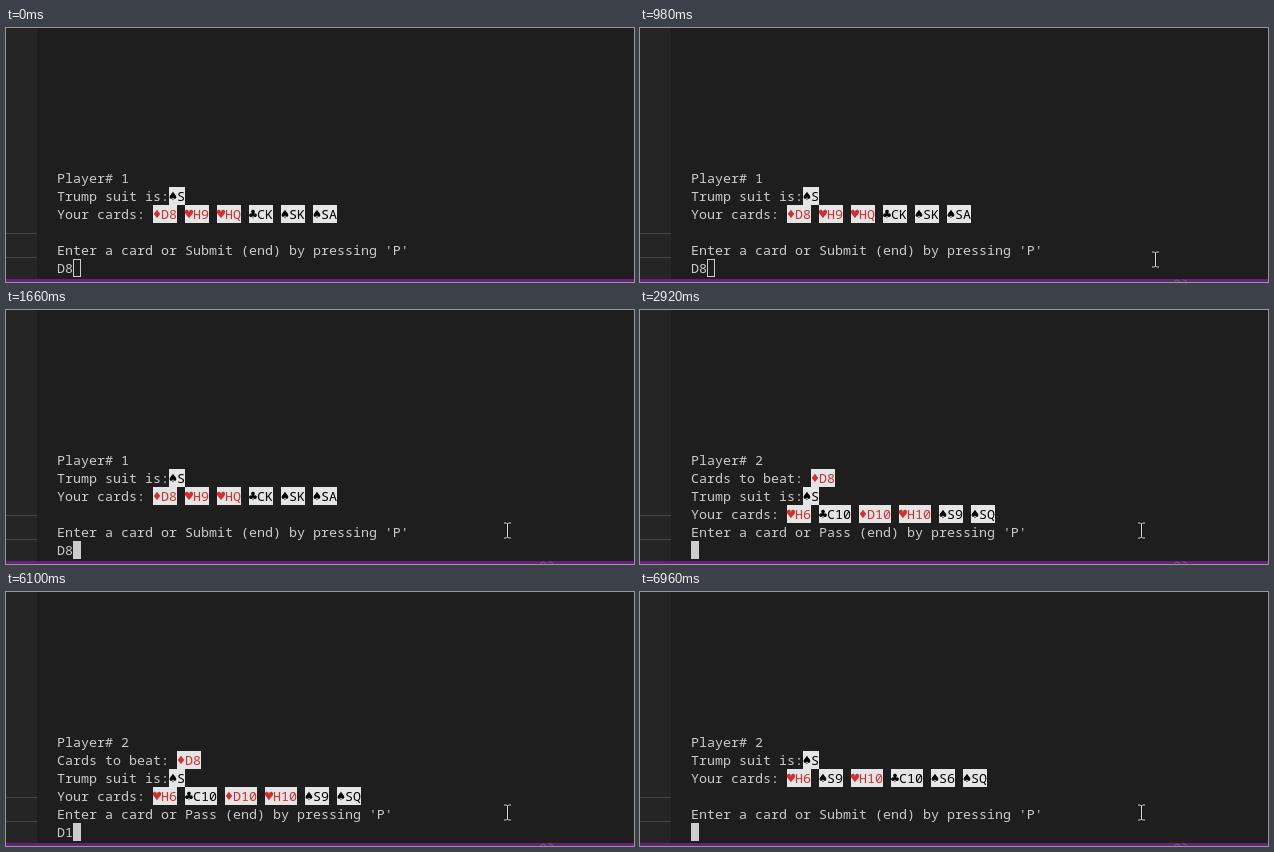
An HTML page that plays this animation: 628 px wide and 254 px high, repeating every 8000 ms.

```html
<!DOCTYPE html>
<html lang="en">
<head>
<meta charset="utf-8">
<title>Card game terminal</title>
<style>
  html, body { margin: 0; width: 100%; height: 100%; overflow: hidden; background: #1e1e1e; }
  svg { display: block; width: 628px; height: 254px; }
  rect { shape-rendering: crispEdges; }
  text { font: 13.3333px "Noto Sans Mono", "DejaVu Sans Mono", monospace; fill: #ccc; white-space: pre; }
  text.suit { font: 14px "DejaVu Sans Mono", monospace; text-anchor: middle; }
</style>
</head>
<body>
<svg viewBox="0 0 628 254" xmlns="http://www.w3.org/2000/svg">
  <rect width="628" height="254" fill="#1e1e1e"/>
  <rect width="31" height="251" fill="#252526"/>
  <rect y="205" width="31" height="1" fill="#444"/>
  <rect y="229" width="31" height="1" fill="#444"/>
  <g id="screens"></g>
  <text id="typed" x="51" y="245"></text>
  <rect id="caret" y="231" width="8" height="18" fill="#ccc"/>
  <rect id="hollow" x="67.5" y="231.5" width="7" height="17" fill="none" stroke="#ccc"/>
  <rect y="251" width="628" height="3" fill="#68217a"/>
  <path id="trace" d="M534 253.5l3-1.5 3 1.5M543 251.5l4 2" fill="none" stroke="#75617a"/>
  <g id="mouse" fill="none">
    <path d="M-3.5 -7.5h2.5l1 1 1 -1h2.5M0 -6.5v13M-3.5 7.5h2.5l1 -1 1 1h2.5" stroke="#111" stroke-width="2.4"/>
    <path d="M-3.5 -7.5h2.5l1 1 1 -1h2.5M0 -6.5v13M-3.5 7.5h2.5l1 -1 1 1h2.5" stroke="#ddd"/>
  </g>
  <circle id="click" cx="499" cy="219" r="15" fill="#ff0" fill-opacity=".47"/>
</svg>
<script>
const LOOP = 8000, CELL = 8, LEFT = 51, TOP = 141, ROW = 18;
const SUITS = { D: '♦', H: '♥', C: '♣', S: '♠' };
const $ = id => document.getElementById(id);

function add(parent, tag, attrs, content = '') {
  const el = document.createElementNS('http://www.w3.org/2000/svg', tag);
  for (const key in attrs) el.setAttribute(key, attrs[key]);
  el.textContent = content;
  parent.append(el);
  return el;
}

function addLine(parent, row, label, cards = '') {
  const top = TOP + row * ROW, y = top + 14;
  add(parent, 'text', { x: LEFT, y }, label);
  let x = LEFT + label.length * CELL;
  for (const card of cards.split(' ').filter(Boolean)) {
    const width = (card.length + 1) * CELL;
    const style = 'fill:' + ('DH'.includes(card[0]) ? '#cd3131' : '#000');
    add(parent, 'rect', { x, y: top, width, height: ROW, fill: '#e5e5e5' });
    add(parent, 'text', { x: x + CELL / 2, y, class: 'suit', style }, SUITS[card[0]] + '\uFE0E');
    add(parent, 'text', { x: x + CELL, y, style }, card);
    x += width + CELL;
  }
}

function addScreen(player, hand, beat) {
  const g = add($('screens'), 'g', {});
  let row = 0;
  addLine(g, row++, 'Player# ' + player);
  if (beat) addLine(g, row++, 'Cards to beat: ', beat);
  // The trump cell shows the suit followed by its letter.
  addLine(g, row++, 'Trump suit is:', 'S');
  addLine(g, row, 'Your cards: ', hand);
  addLine(g, 4, `Enter a card or ${beat ? 'Pass' : 'Submit'} (end) by pressing 'P'`);
  return g;
}

const screens = [
  addScreen(1, 'D8 H9 HQ CK SK SA'),
  addScreen(2, 'H6 C10 D10 H10 S9 SQ', 'D8'),
  addScreen(2, 'H6 S9 H10 C10 S6 SQ')
];

// Each list holds [start time, value] pairs; a value stays until the next start.
const SCREEN = [[0, 0], [2920, 1], [6960, 2]];
const TYPED = [[0, 'D8'], [2920, ''], [5370, 'D'], [6100, 'D1'], [6170, 'D10'], [6960, '']];
const MOUSE = [
  [0, null], [720, [540, 253]], [790, [535, 249]], [850, [528, 243]], [920, [521, 236]],
  [980, [515, 231]], [1050, [509, 225]], [1120, [504, 218]], [1180, [501, 214]],
  [1250, [500, 213]], [1390, [501, 220]]
];
const at = (list, t) => list.findLast(([start]) => start <= t)[1];
const show = (el, visible) => el.setAttribute('visibility', visible ? 'visible' : 'hidden');

function draw(t) {
  const typed = at(TYPED, t), mouse = at(MOUSE, t), focused = t >= 1520;
  screens.forEach((g, i) => show(g, i === at(SCREEN, t)));
  $('typed').textContent = typed;
  $('caret').setAttribute('x', LEFT + typed.length * CELL);
  show($('caret'), focused);
  show($('hollow'), !focused);
  show($('trace'), t >= 720);
  show($('mouse'), mouse);
  if (mouse) $('mouse').setAttribute('transform', `translate(${mouse[0] + .5} ${mouse[1] + .5})`);
  show($('click'), t >= 1390 && t < 1660);
}

const began = performance.now();
function tick() {
  draw((performance.now() - began) % LOOP);
  requestAnimationFrame(tick);
}
tick();
</script>
</body>
</html>
```
